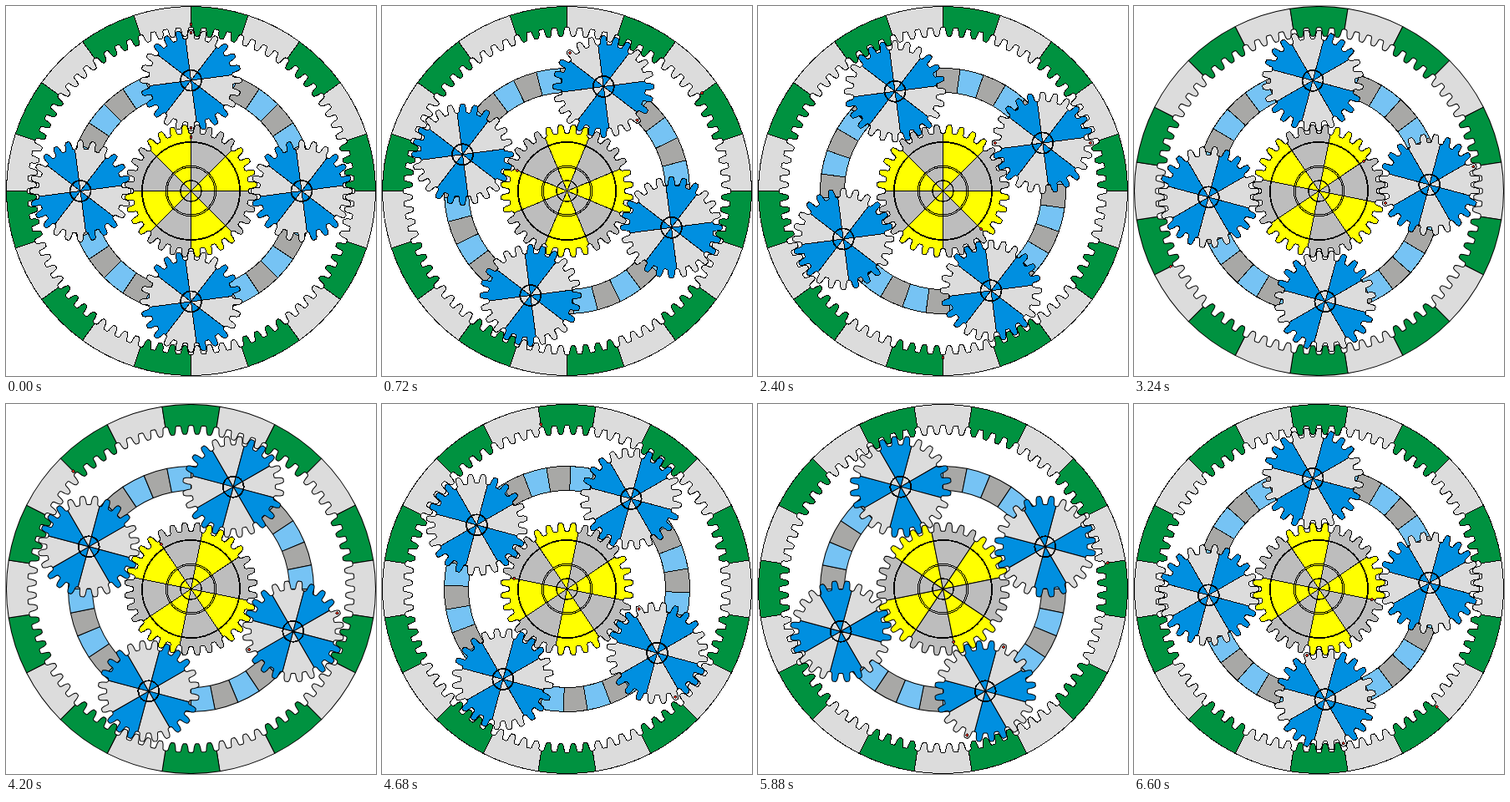
An HTML page for the animation above (6720 ms loop, 443 px wide and 443 px high).

```html
<!DOCTYPE html>
<html lang="en">
<head>
<meta charset="utf-8">
<title>Planetary gear</title>
<style>
  /* One stepped clock drives every gear, so lines are redrawn sharply at each step. */
  @property --clock { syntax: '<number>'; inherits: true; initial-value: 0; }
  @keyframes tick { from { --clock: 0; } to { --clock: 1; } }
  html, body { margin: 0; width: 100%; height: 100%; overflow: hidden; background: #fff; }
  svg { display: block; width: 443px; height: 443px; shape-rendering: crispEdges;
        animation: tick 6720ms steps(56, end) infinite; }
  path { stroke: #000; stroke-width: 1; stroke-linejoin: round; }
  .spin { transform: rotate(calc(var(--turn) * var(--clock))); }
</style>
</head>
<body>
<svg><g id="stage" transform="translate(221.5 221.5)"></g></svg>
<script>
const MODULE = 4.73;                        // pitch diameter per tooth
const TEETH = { sun: 32, planet: 24, ring: 80 };
const ORBIT = (TEETH.sun + TEETH.planet) * MODULE / 2;
const TURN = { ring: 504, sun: -630, carrier: 180, planet: 1080 };  // degrees per loop

// half a tooth: [offset from tooth centre in pitches, height over the pitch circle]
const FLANK = [[-0.36, -6.5], [-0.29, -5.2], [-0.26, -2], [-0.23, 0.5], [-0.17, 2.8], [-0.11, 3.8]];
const PROFILE = [...FLANK, ...FLANK.map(([o, h]) => [-o, h]).reverse()];

const stage = document.getElementById('stage');

function add(parent, tag, attrs = {}) {
  const el = document.createElementNS('http://www.w3.org/2000/svg', tag);
  for (const name in attrs) el.setAttribute(name, attrs[name]);
  parent.append(el);
  return el;
}

const spinner = (parent, degrees) =>
  add(parent, 'g', { class: 'spin', style: `--turn: ${degrees}deg` });

function polar(deg, r) {
  const a = deg * Math.PI / 180;
  return (r * Math.sin(a)).toFixed(2) + ' ' + (-r * Math.cos(a)).toFixed(2);
}

function toothedEdge(teeth, start, count, dir) {
  const pitch = 360 / teeth, radius = teeth * MODULE / 2;
  const points = [polar(start, radius - 6.9 * dir)];
  for (let k = 0; k < count; k++)
    for (const [offset, height] of PROFILE)
      points.push(polar(start + (k + 0.5 + offset) * pitch, radius + height * dir));
  points.push(polar(start + count * pitch, radius - 6.9 * dir));
  return 'M' + points.join('L');
}

const arcTo = (r, deg, sweep) => `A${r} ${r} 0 0 ${sweep} ${polar(deg, r)}`;

function sectors(parent, count, start, colors, shape) {
  const width = 360 / count;
  for (let i = 0; i < count; i++) {
    const from = start + i * width;
    add(parent, 'path', { d: shape(from, from + width), fill: colors[i % 2] });
  }
}

function gear(parent, teeth, start, colors) {
  sectors(parent, 8, start, colors, from => toothedEdge(teeth, from, teeth / 8, 1) + 'L0 0Z');
}

function circle(parent, r, width) {
  add(parent, 'circle', { r, fill: 'none', stroke: '#000', 'stroke-width': width });
}

function mark(parent, y) {
  add(parent, 'circle', { cy: y, r: 1.6, fill: '#e03020', stroke: '#000', 'stroke-width': 0.8 });
}

const ring = spinner(stage, TURN.ring);
sectors(ring, 20, 0, ['#009240', '#dcdcdc'], (from, to) =>
  toothedEdge(TEETH.ring, from, 4, -1) + 'L' + polar(to, 221) + arcTo(221, from, 0) + 'Z');
mark(ring, -199.5);

const sun = spinner(stage, TURN.sun);
gear(sun, TEETH.sun, 0, ['#bdbdbd', '#ffff00']);
circle(sun, 58.5, 1.8);
circle(sun, 30.2, 1);
circle(sun, 28.4, 1);
circle(sun, 12.5, 1.4);
mark(sun, -64.5);

const carrier = spinner(stage, TURN.carrier);
sectors(carrier, 32, 0, ['#a8a8a6', '#76c3f4'], (from, to) =>
  'M' + polar(from, 147) + arcTo(147, to, 1) + 'L' + polar(to, 118) + arcTo(118, from, 0) + 'Z');

for (let i = 0; i < 4; i++) {
  const mount = add(carrier, 'g', { transform: `translate(${polar(i * 90, ORBIT)})` });
  const planet = spinner(mount, TURN.planet);
  gear(planet, TEETH.planet, -7.5, ['#dcdcdc', '#008fe0']);
  circle(planet, 12.5, 1.8);
  if (i === 0) [-57, 57].forEach(y => mark(planet, y));
}
</script>
</body>
</html>
```
